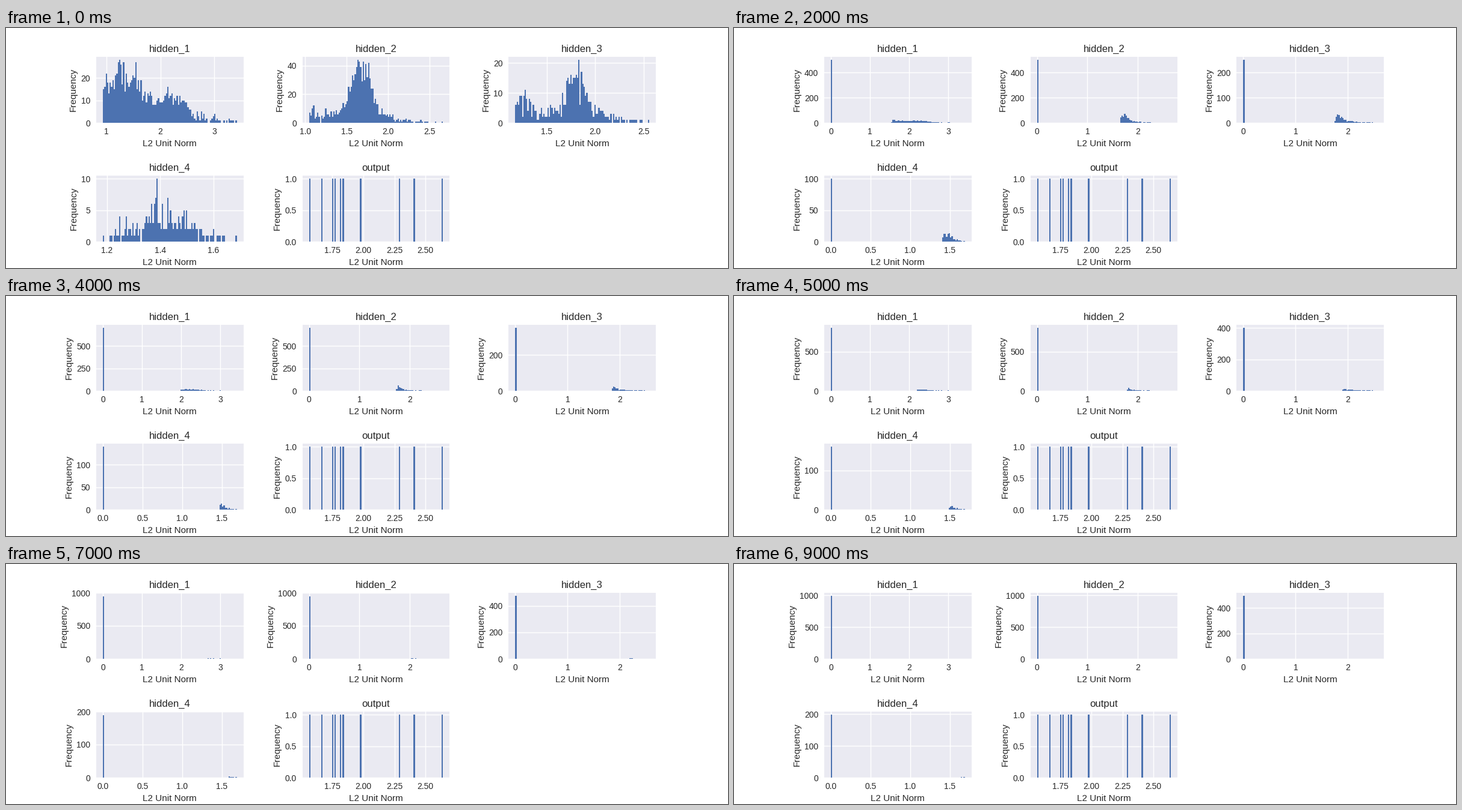
A matplotlib script that plays this animation: 1200x400 px, repeating every 10000 ms.

```python
import matplotlib.pyplot as plt
import numpy as np
from matplotlib.animation import FuncAnimation

plt.rcParams.update({
    "font.family": "Liberation Sans",
    "text.color": ".15", "axes.labelcolor": ".15",
    "xtick.color": ".15", "ytick.color": ".15",
    "font.size": 10, "axes.titlesize": 12, "axes.labelsize": 11,
    "xtick.labelsize": 10, "ytick.labelsize": 10,
    "axes.facecolor": "#EAEAF2", "axes.edgecolor": "white",
    "axes.linewidth": 0, "axes.axisbelow": True,
    "axes.grid": True, "grid.color": "white", "grid.linewidth": 1,
    "xtick.major.size": 0, "ytick.major.size": 0,
    "xtick.major.pad": 6, "ytick.major.pad": 7,
})

BINS = 100
BLUE = "#4C72B0"
PRUNED = [0, .25, .5, .6, .7, .8, .9, .95, .97, .99]
rng = np.random.default_rng(4)


def spread(bins, lo, hi):
    """Sorted norms, one somewhere inside each given bin, spanning lo to hi."""
    places = np.sort(bins + rng.uniform(.1, .9, len(bins)))
    places[0], places[-1] = 0, BINS
    return lo + (hi - lo) * places / BINS


def layer(size, lo, hi, peak, outline):
    """Norms whose histogram follows a rough outline; peak is (bin, height)."""
    shape = np.interp(np.arange(BINS), *zip(*outline))
    noisy = shape + .7 * np.sqrt(shape) * rng.normal(size=BINS)
    at, height = peak
    counts = np.clip(np.round(noisy), 0, height - 1).astype(int)
    counts[at] = height
    while counts.sum() != size:
        body = np.flatnonzero((counts > 2) & (counts < height - 1))
        counts[rng.choice(body)] += np.sign(size - counts.sum())
    return spread(np.repeat(np.arange(BINS), counts), lo, hi)


LAYERS = {
    "hidden_1": layer(1000, .935, 3.418, (12, 28), [
        (0, 17), (6, 18), (13, 24), (17, 19), (24, 22), (30, 14), (40, 9),
        (47, 13), (55, 11), (62, 8), (68, 3), (80, 2), (99, .4)]),
    "hidden_2": layer(1000, 1.048, 2.66, (36, 44), [
        (0, 10), (5, 7), (14, 6), (22, 8), (27, 13), (29, 23), (33, 29),
        (36, 43), (40, 38), (44, 29), (48, 18), (52, 12), (60, 6), (68, 2),
        (80, .8), (99, .2)]),
    "hidden_3": layer(500, 1.172, 2.558, (47, 21), [
        (0, 7), (6, 8), (13, 4), (20, 2.5), (27, 4.5), (36, 6), (38, 14),
        (47, 17), (53, 8), (60, 4.5), (68, 3), (75, 1.2), (99, .3)]),
    "hidden_4": layer(200, 1.1855, 1.688, (40, 10), [
        (0, .7), (8, 1.3), (18, 2.5), (28, 1.2), (31, 4), (46, 4.3),
        (55, 4), (66, 2.5), (72, 1), (99, .3)]),
    "output": spread(np.array([0, 9, 17, 19, 23, 25, 38, 67, 78, 99]),
                     1.5625, 2.641),
}

fig = plt.figure(figsize=(12, 4), dpi=100, facecolor="white")
fig.subplots_adjust(left=.125, right=.9, bottom=.11, top=.88,
                    wspace=.4, hspace=.8)
axes = [fig.add_subplot(2, 3, i + 1) for i in range(len(LAYERS))]


def draw(frame):
    for ax, (name, norms) in zip(axes, LAYERS.items()):
        values = norms.copy()
        if name != "output":
            values[:round(PRUNED[frame] * len(values))] = 0
        ax.clear()
        ax.hist(values, bins=BINS, color=BLUE)
        ax.set(title=name, xlabel="L2 Unit Norm", ylabel="Frequency")
        # Keep a tick that falls just past the upper limit.
        top = ax.get_ylim()[1]
        ax.set_ylim(0, max(top, *(t for t in ax.get_yticks() if t < top * 1.005)))


animation = FuncAnimation(fig, draw, frames=len(PRUNED), interval=1000,
                          repeat=True, repeat_delay=0)
plt.show()
```
